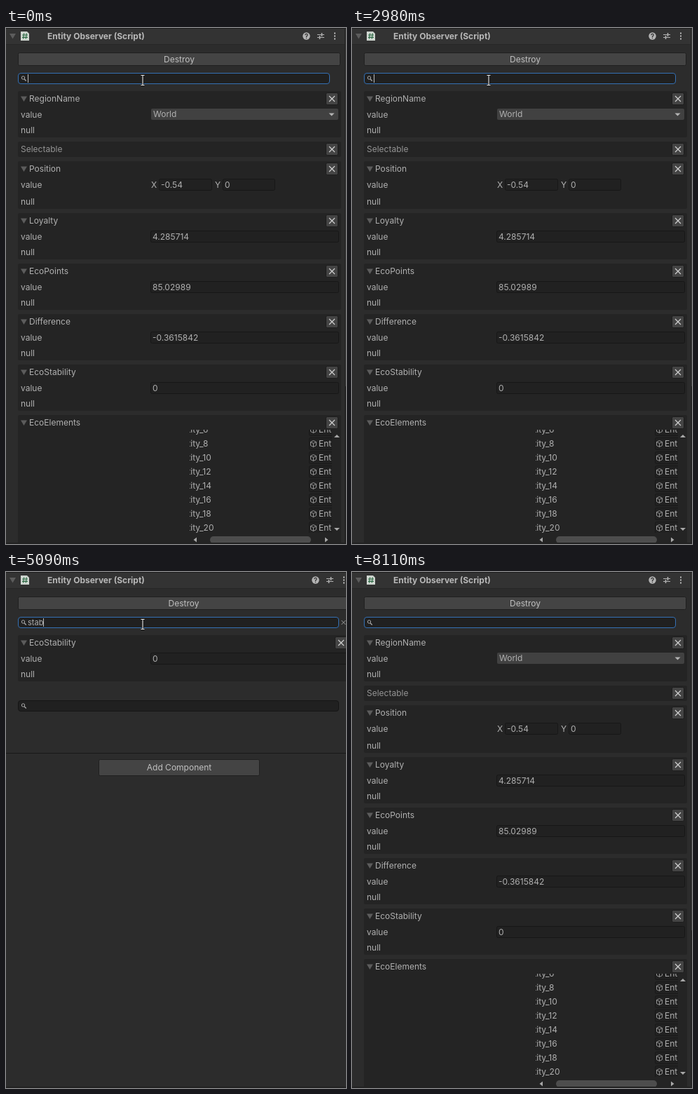
Recreate the animation shown at these times as an HTML page. Size 485 px wide and 736 px high, loop 8.18 s.

```html
<!DOCTYPE html>
<html lang="en">
<head>
<meta charset="utf-8">
<title>Entity inspector search</title>
<style>
html, body { margin: 0; width: 100%; height: 100%; overflow: hidden; background: #2c2c2c; }
svg { display: block; }
text { font: 12px Inter, Roboto, sans-serif; fill: #b0b0b0; white-space: pre; }
.title { font-weight: 700; fill: #b8b8b8; }
.button { fill: #c0c0c0; text-anchor: middle; }
.plain { fill: #949494; }
.search { font-size: 11px; }
</style>
</head>
<body>
<svg id="stage" width="485" height="736" viewBox="0 0 485 736">
  <g id="panel"></g>
  <rect id="caret" y="66" width="1" height="12" fill="#bdbdbd"/>
  <g id="pointer"></g>
</svg>
<script>
const LOOP = 8180;
const WIDE_SHIFT = 13;
const MOVE = { start: 7280, end: 7650, steps: 13 };

const COMPONENTS = [
  { name: 'RegionName', choice: 'World' },
  { name: 'Selectable', height: 22 },
  { name: 'Position', vector: ['-0.54', '0'], height: 68 },
  { name: 'Loyalty', value: '4.285714' },
  { name: 'EcoPoints', value: '85.02989' },
  { name: 'Difference', value: '-0.3615842' },
  { name: 'EcoStability', value: '0' },
  { name: 'EcoElements', ids: [6, 8, 10, 12, 14, 16, 18, 20], firstRow: 21, listHeight: 147, height: 206 },
  { name: 'EcoStates', ids: [22, 23, 24, 25], firstRow: 29, listHeight: 75, height: 134 },
];

const QUERIES = [
  [0, ''], [60, 'r'], [440, 're'], [860, 'reg'], [1120, 'regi'], [1480, 'regio'], [1680, 'region'],
  [2980, ''], [4110, 's'], [4490, 'st'], [4740, 'sta'], [5090, 'stab'], [6620, ''],
];

const byId = id => document.getElementById(id);
const rect = (x, y, w, h, fill, extra = '') =>
  `<rect x="${x}" y="${y}" width="${w}" height="${h}" fill="${fill}" ${extra}/>`;
const text = (x, y, str, cls = '') => `<text x="${x}" y="${y}" class="${cls}">${str}</text>`;
const path = (d, stroke, width = 1) =>
  `<path d="${d}" fill="none" stroke="${stroke}" stroke-width="${width}"/>`;
const shape = (d, fill) => `<path d="${d}" fill="${fill}"/>`;
const cross = (x, y, r, color, width) =>
  path(`M${x - r} ${y - r}l${2 * r} ${2 * r}m0 ${-2 * r}l${-2 * r} ${2 * r}`, color, width);
const foldout = (x, y) => shape(`M${x} ${y}h9l-4.5 7.5z`, '#5c5c5c');

const button = (x, y, w, h, label) =>
  rect(x + .5, y + .5, w - 1, h - 1, '#444', 'rx="2" stroke="#202020"') +
  text(x + w / 2, y + h / 2 + 4, label, 'button');

const field = (x, y, w, str, hover) =>
  rect(x + .5, y + .5, w - 1, 16, '#212121', `rx="2" stroke="${hover ? '#505050' : '#171717'}"`) +
  text(x + 3, y + 13, str);

function searchBox(y, right, focused) {
  return rect(17.5, y + .5, right - 18, 15, '#202020',
    `rx="3.5" stroke="${focused ? '#3470b4' : '#151515'}"`) +
    `<circle cx="24.5" cy="${y + 7}" r="2.2" fill="none" stroke="#a8a8a8"/>` +
    path(`M26 ${y + 8.7}l2.8 2.8`, '#a8a8a8', 1.3);
}

function header(shift) {
  const help = 428.5 + shift, sliders = 444 + shift, dots = 469 + shift;
  return rect(0, 0, 485, 23, '#333') + rect(0, 0, 485, 1, '#1c1c1c') + rect(0, 23, 485, 1, '#272727') +
    foldout(5, 8) +
    shape('M21 5h9l3 3v10h-12z', '#cfd6d0') +
    path('M25.7 7.5l-1 8M29.3 7.5l-1 8M23 10h8M23 13.3h8', '#2f6b46', 1.2) +
    text(59, 16, 'Entity Observer (Script)', 'title') +
    `<circle cx="${help}" cy="11.5" r="5.2" fill="#b4b4b4"/>` +
    path(`M${help - 1.7} 10.3q0-2 1.7-2t1.7 1.6q0 1.2-1.7 2v1m0 .8v1.2`, '#333', 1.2) +
    path(`M${sliders} 9.5h10M${sliders} 13.5h10`, '#b4b4b4') +
    path(`M${sliders + 6.5} 7v5M${sliders + 3.5} 11v5`, '#b4b4b4', 1.5) +
    [7.5, 11.5, 15.5].map(y => rect(dots - 1, y - 1, 2, 2, '#b8b8b8')).join('');
}

function entityRow(y, id) {
  return text(245, y + 4, 'Entity_' + id) +
    rect(432.5, y - 8.5, 80, 17, '#212121', 'rx="2" stroke="#191919"') +
    path(`M438.5 ${y - 4.5}l4 2v5l-4 2l-4-2v-5zm-4 2l4 2l4-2m-4 2v5`, '#a0a0a0', .9) +
    text(446, y + 4, 'Entity');
}

function entityList(c, y, shift) {
  const left = 262, top = y + 21, w = 203 + shift, h = c.listHeight;
  const bar = y + h + 31, right = 472 + shift;
  const rows = c.ids.map((id, i) => entityRow(y + c.firstRow + 20 * i, id)).join('');
  return `<svg x="${left}" y="${top}" width="${w}" height="${h}" viewBox="${left} ${top} ${w} ${h}">${rows}</svg>` +
    shape(`M${right - 4} ${y + 32}l4-4l4 4z`, '#a8a8a8') +
    shape(`M${right - 4} ${top + h - 7}l4 4l4-4z`, '#a8a8a8') +
    shape(`M272 ${bar - 3.5}l-4.5 3.5l4.5 3.5z`, '#a8a8a8') +
    shape(`M${455 + shift} ${bar - 3.5}l4.5 3.5l-4.5 3.5z`, '#a8a8a8') +
    rect(291, bar - 5, 144 + shift, 10, '#4d4d4d', 'rx="5"');
}

function component(c, y, shift, mouse) {
  const h = c.height || 66, closeX = 456 + shift;
  const over = (x, w) => mouse && mouse.x >= x && mouse.x <= x + w && mouse.y >= y + 25 && mouse.y <= y + 42;
  let out = rect(17, y, 461 + shift, h, '#242424', 'rx="2"') +
    rect(closeX + .5, y + 2.5, 17, 17, '#444', 'rx="2" stroke="#1d1d1d"') +
    cross(closeX + 9, y + 11, 4, '#cfcfcf', 1.2);
  if (h === 22) return out + text(21, y + 15, c.name, 'plain');

  out += foldout(21, y + 7.5) + text(33, y + 15, c.name) + text(21, y + h - 6, 'null');
  if (c.ids) return out + entityList(c, y, shift);

  out += text(21, y + 38, 'value');
  if (c.choice) {
    const w = 267 + shift;
    out += rect(207, y + 25, w, 16, over(207, w) ? '#505050' : '#414141', 'rx="2"') +
      text(210, y + 37, c.choice) + shape(`M${460.5 + shift} ${y + 31.5}h8l-4 4z`, '#b4b4b4');
  } else if (c.vector) {
    out += text(207, y + 38, 'X') + field(218, y + 25, 76, c.vector[0], over(218, 76)) +
      text(298, y + 38, 'Y') + field(309, y + 25, 75, c.vector[1], over(309, 75));
  } else {
    out += field(206, y + 25, 269 + shift, c.value, over(206, 269));
  }
  return out;
}

function panel(query, mouse) {
  const shown = COMPONENTS.filter(c => c.name.toLowerCase().includes(query));
  const end = shown.reduce((y, c) => y + (c.height || 66) + 6, 90);
  const fits = end < 400, shift = fits ? WIDE_SHIFT : 0;
  let out = rect(0, 0, 485, 736, '#2c2c2c') + header(shift) +
    button(17, 35, 460 + shift, 19, 'Destroy') + searchBox(64, 462 + shift, true);
  if (query) out += text(31, 76, query, 'search') + cross(468.5 + shift, 72, 3, '#9a9a9a', 1);

  let y = 90;
  for (const c of shown) {
    if (y < 736) out += component(c, y, shift, mouse);
    y += (c.height || 66) + 6;
  }
  out += searchBox(end + 21, 462 + shift, false);
  if (fits) {
    out += rect(0, end + 96, 485, 1, '#191919') + button(132, end + 105, 230, 24, 'Add Component');
  } else {
    out += rect(483, 0, 2, 736, '#212121') + rect(484, 1, 1, query ? 697 : 510, '#3c3c3c');
  }
  return out + rect(0, 734, 485, 2, '#222');
}

function mouseAt(t) {
  if (t < MOVE.start) return { x: 195, y: 74 };
  const step = Math.floor((t - MOVE.start) / (MOVE.end - MOVE.start) * (MOVE.steps - 1)) + 1;
  if (step >= MOVE.steps) return null;
  const p = step / (MOVE.steps - 1);
  return { x: 195 - 34 * p + 55 * Math.sin(Math.PI * p), y: 74 + 613 * p ** 1.4 };
}

function pointerArt(mouse) {
  if (!mouse) return '';
  const { x, y } = mouse;
  if (y < 82) {
    const beam = `M${x - 2.5} ${y - 6.5}h2l.5 .5l.5-.5h2M${x} ${y - 6}v13M${x - 2.5} ${y + 7.5}h2l.5-.5l.5 .5h2`;
    return path(beam, '#151515', 2.4) + path(beam, '#eee', 1.1);
  }
  return `<path d="M${x} ${y}v16l3.7-3.5l2.5 6l2.3-1l-2.5-5.8h5.2z" fill="#fff" stroke="#111" stroke-width=".8"/>`;
}

let lastKey;
function draw(now) {
  const t = now % LOOP;
  const query = QUERIES.findLast(([start]) => t >= start)[1];
  const mouse = mouseAt(t);
  const caretOn = t < 8110;
  const key = [query, mouse && mouse.y, caretOn].join();
  if (key !== lastKey) {
    lastKey = key;
    byId('panel').innerHTML = panel(query, mouse);
    byId('pointer').innerHTML = pointerArt(mouse);
    const typed = document.querySelector('.search');
    byId('caret').setAttribute('x', 31 + Math.round(typed ? typed.getComputedTextLength() : 0));
    byId('caret').setAttribute('visibility', caretOn ? 'visible' : 'hidden');
  }
}

const origin = performance.now();
function tick() {
  draw(performance.now() - origin);
  requestAnimationFrame(tick);
}
tick();
</script>
</body>
</html>
```
